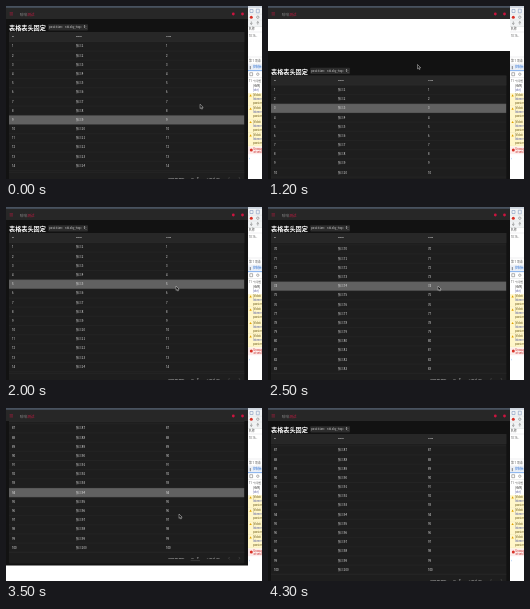
Recreate the animation shown at these times as an HTML page. Size 256x173 px, loop 5.37 s.

```html
<!DOCTYPE html>
<html lang="zh">
<head>
<meta charset="utf-8">
<title>表格表头固定</title>
<style>
html, body { margin: 0; width: 100%; height: 100%; overflow: hidden; background: #fff; }
svg { display: block; width: 256px; height: 173px; }
text { font-family: Roboto, "Noto Sans CJK SC", "Noto Sans CJK", sans-serif; dominant-baseline: central; white-space: pre; }
.mono { font-family: "Noto Sans Mono", "DejaVu Sans Mono", monospace; }
.cjk { font-family: "Noto Sans CJK SC", "Noto Sans CJK", sans-serif; }
</style>
</head>
<body>
<svg id="stage" viewBox="0 0 256 173">
  <defs>
    <clipPath id="view"><rect width="242" height="173"/></clipPath>
    <clipPath id="body"><rect x="3" y="35.6" width="235.4" height="130.6"/></clipPath>
  </defs>
</svg>
<script>
const NS = 'http://www.w3.org/2000/svg';
const LOOP = 5370, STEP = 100;
const WIDE = 242, ROW = 9.18, TOP = 35.9, END = 787.6;

function add(parent, tag, attrs, content) {
  const el = document.createElementNS(NS, tag);
  for (const k in attrs) el.setAttribute(k, attrs[k]);
  if (content !== undefined) el.textContent = content;
  parent.appendChild(el);
  return el;
}
const group = (p, attrs = {}) => add(p, 'g', attrs);
const rect = (p, x, y, width, height, fill, rx = 0) => add(p, 'rect', { x, y, width, height, fill, rx });
const line = (p, d, stroke, w = 0.5) => add(p, 'path', { d, stroke, 'stroke-width': w, fill: 'none' });
const dot = (p, cx, cy, r, fill) => add(p, 'circle', { cx, cy, r, fill });
const label = (p, x, y, size, fill, str, extra = {}) =>
  add(p, 'text', { x, y, 'font-size': size, fill, ...extra }, str);

const stage = document.getElementById('stage');
const view = group(stage, { 'clip-path': 'url(#view)' });
rect(view, 0, 0, WIDE, 173, '#fff');

// Scrolling page
const page = group(view);
rect(page, 0, 1.5, WIDE, 178, '#121212');
label(page, 3, 21.5, 6.15, '#fff', '表格表头固定', { 'font-weight': 700, class: 'cjk' });
rect(page, 42.2, 18.2, 39.8, 6.2, '#2c2c2c', 0.8);
label(page, 43.3, 21.4, 2.62, '#dcdcdc', 'position: sticky;top: 0;', { class: 'mono' });
rect(page, 3, 26, 235.4, 151.4, '#1e1e1e', 0.8);

// Table rows
const rows = group(group(page, { 'clip-path': 'url(#body)' }));
const hover = rect(rows, 3, 0, 235.4, ROW, '#616161');
for (let n = 1; n <= 100; n++) {
  const y = TOP + (n - 0.5) * ROW;
  label(rows, 6, y, 2.7, '#eee', n);
  label(rows, 70, y, 2.9, '#eee', '张三' + n, { class: 'cjk' });
  label(rows, 160, y, 2.7, '#eee', n);
  line(rows, `M3 ${y + ROW / 2}H238.4`, '#363636', 0.25);
}

// Sticky header and footer
rect(page, 3, 26, 235.4, 9.6, '#272727');
['id', 'name', 'code'].forEach((s, i) =>
  label(page, [6, 70, 160][i], 30.7, 2.3, '#c8c8c8', s, { 'font-weight': 700 }));
line(page, 'M3 35.6H238.4M3 166.3H238.4', '#363636', 0.3);
const footer = group(page, { transform: 'translate(0 172.2)' });
label(footer, 162.5, 0, 2.35, '#ddd', 'Rows per page:');
label(footer, 185, -0.2, 2.35, '#ddd', 'All');
label(footer, 200.5, 0, 2.35, '#ddd', '1-100 of 100');
add(footer, 'path', { d: 'M190.8 -0.6h2l-1 1.1z', fill: '#bbb' });
line(footer, 'M184.6 2.4H194', '#8a8a8a', 0.25);
line(footer, 'M223.6 -1.2l-1 1.2l1 1.2M232.8 -1.2l1 1.2l-1 1.2', '#666', 0.4);

// App bar
rect(view, 0, 0, WIDE, 13, '#272727');
rect(view, 0, 0, WIDE, 1.8, '#48525f');
line(view, 'M3.6 6.6H7M3.6 7.8H7M3.6 9H7', '#b81c40', 0.45);
label(view, 13.8, 8, 3.7, '#808080', '哈哈', { class: 'cjk' });
label(view, 21.2, 8, 3.7, '#c81a42', '测试', { class: 'cjk' });
for (const x of [227.3, 236.5]) dot(view, x, 8, 1.4, '#cc143f');

// Inspector panel
const panel = group(stage);
rect(panel, WIDE, 0, 14, 173, '#fff');
rect(panel, WIDE, 0, 14, 21, '#f1f3f4');
rect(panel, WIDE, 0, 14, 1.8, '#cbd3dd');
for (const y of [8.2, 14, 20.6, 26, 51, 58, 64.8, 71.5]) line(panel, `M${WIDE} ${y}H256`, '#d3d6da', 0.4);
line(panel, 'M244 3.5h3v3h-3zM250.3 3.2h3v3.6h-3z', '#7088b4', 0.5);
dot(panel, 245.3, 11.2, 1.5, '#d93025');
line(panel, 'M245.3 15.4v3M244 17.2l1.3 1.2l1.3-1.2M251.8 18.6v-3M250.5 16.8l1.3-1.2l1.3 1.2', '#666', 0.5);
for (const y of [11.2, 68.2]) add(panel, 'circle', { cx: 251.8, cy: y, r: 1.2, fill: 'none', stroke: '#666', 'stroke-width': 0.5 });
line(panel, 'M243.8 66.7h2.8v3h-2.8z', '#666', 0.5);
rect(panel, WIDE, 58.4, 14, 6.2, '#e9eef6');
line(panel, 'M244.3 60v3.2', '#555', 0.7);
label(panel, 247, 61.4, 2.9, '#1a66d2', '控制台');
line(panel, 'M242 64.6H256', '#1a73e8', 0.5);
label(panel, 242.8, 23.4, 2.9, '#444', '名称');
label(panel, 242.8, 29.7, 2.7, '#555', '10.16…');
label(panel, 243, 54.8, 2.9, '#555', '第 1 项请');
label(panel, 242.8, 74.6, 2.8, '#555', '11 个问题');
label(panel, 247, 80, 2.6, '#444', '[HMR]');
label(panel, 247, 84.2, 2.6, '#54599b', '[vite]');
for (let i = 0; i < 4; i++) {
  const y = 87.2 + i * 13.3;
  rect(panel, WIDE, y, 14, 12.6, '#fff6c9');
  line(panel, `M${WIDE} ${y + 12.9}H256`, '#efdc86', 0.5);
  add(panel, 'path', { d: `M243.4 ${y + 3.3}l1.2-2.2l1.2 2.2z`, fill: '#e3a400' });
  ['[Violati', 'listener', 'passive'].forEach((s, k) =>
    label(panel, 247, y + 2.3 + k * 4, 2.6, k === 1 ? '#4a55a0' : '#6b5a17', s));
}
rect(panel, WIDE, 140.8, 14, 7.4, '#fdeceb');
dot(panel, 245.3, 144, 1.5, '#d93025');
label(panel, 247.6, 143, 2.6, '#c5221f', 'Uncaug');
label(panel, 247.6, 146.6, 2.6, '#c5221f', 'at setu');
label(panel, 243, 153, 3, '#1a73e8', '›');

const cursor = add(stage, 'path', {
  d: 'M0 0V4.4L1 3.5L1.7 5L2.5 4.7L1.8 3.2H3.2Z',
  fill: '#111', stroke: '#ddd', 'stroke-width': 0.45
});

// Progress of t through a span, 0 to 1
const span = (t, from, to) => Math.min(1, Math.max(0, (t - from) / (to - from)));

// Overscroll: quick pull that slows down, then a soft return
const pull = (t, from, peak, to, size, power) =>
  size * (1 - (1 - span(t, from, peak)) ** power) * (1 - span(t, peak, to)) ** 2;
const pageShift = t => pull(t, 700, 1200, 2000, 43.5, 7) - pull(t, 3200, 3500, 4100, 22, 2);

function tableScroll(t) {
  const p = span(t, 2000, 2700);
  return END * p * p * (3 - 2 * p);
}

// Pointer glides: start, end, x, y
const glides = [
  [-100, 130, 185, 75], [400, 520, 149.5, 58.5], [1700, 1900, 170, 79],
  [2800, 2900, 172, 98], [2900, 3050, 173, 106]
];
function pointer(t) {
  let x = 201, y = 116;
  for (const [from, to, gx, gy] of glides) {
    const p = span(t, from, to);
    x += (gx - x) * p;
    y += (gy - y) * p;
  }
  return [x, y];
}

// The highlight trails the pointer by one step and freezes during the first pull
function hoverRow(t) {
  const seen = t > 700 && t < 2000 ? 700 : t;
  const [, y] = pointer(seen - STEP);
  return Math.floor((y - TOP + tableScroll(seen)) / ROW);
}

function draw(now) {
  const t = Math.floor((now % LOOP) / STEP) * STEP;
  const shown = t < 4300 ? 'visible' : 'hidden';
  page.setAttribute('transform', `translate(0 ${pageShift(t)})`);
  rows.setAttribute('transform', `translate(0 ${-tableScroll(t)})`);
  hover.setAttribute('y', TOP + hoverRow(t) * ROW);
  hover.setAttribute('visibility', shown);
  cursor.setAttribute('transform', `translate(${pointer(t)})`);
  cursor.setAttribute('visibility', shown);
}

const start = performance.now();
function tick() {
  draw(performance.now() - start);
  requestAnimationFrame(tick);
}
tick();
</script>
</body>
</html>
```
